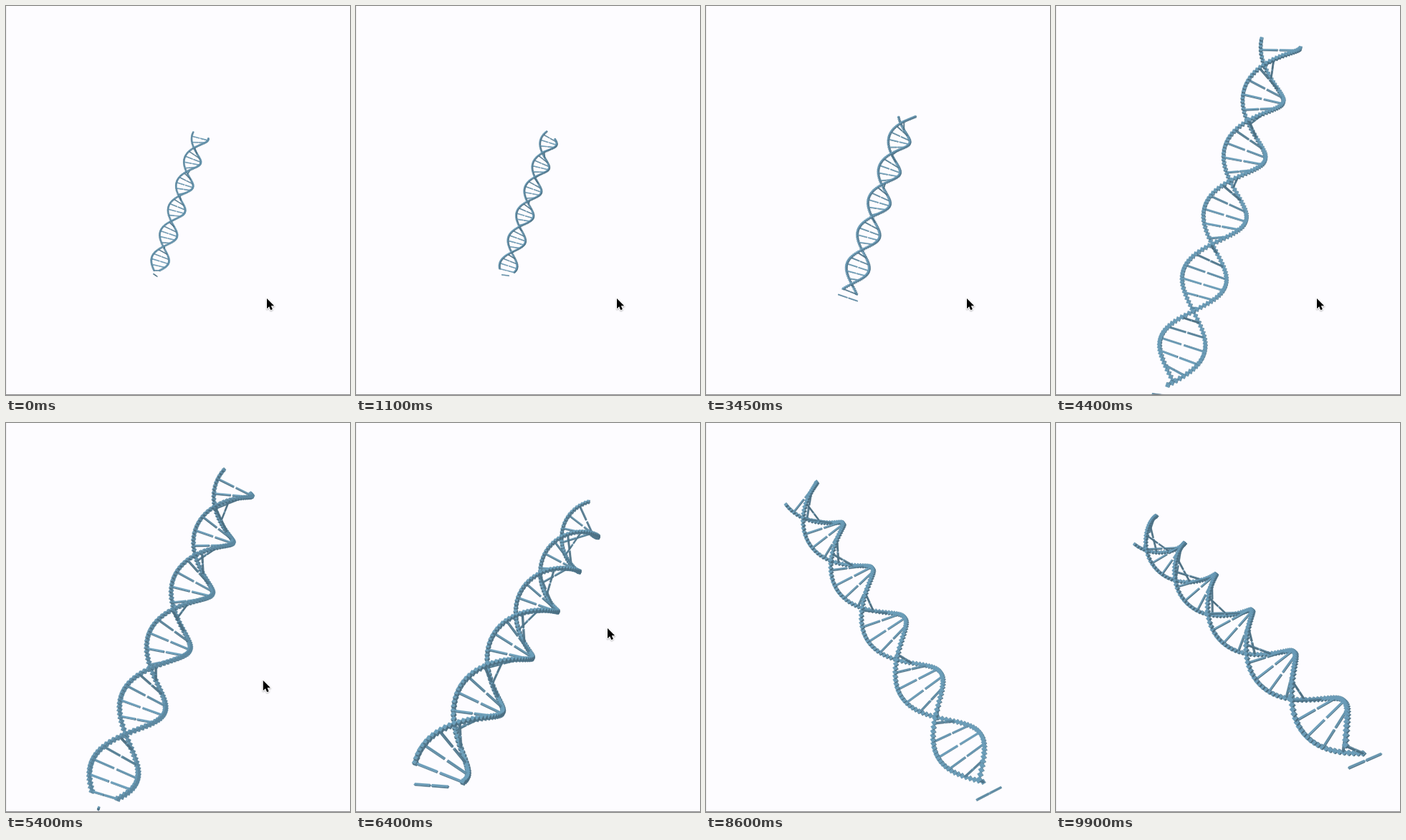
Write an HTML page with a canvas that moves like this. It is 480 px wide and 544 px high and loops after 9950 ms.

```html
<!DOCTYPE html>
<html lang="en">
<head>
<meta charset="utf-8">
<title>Rotating double helix</title>
<style>
html, body { margin: 0; width: 100%; height: 100%; overflow: hidden; background: #fdfcff; }
canvas { display: block; width: 480px; height: 544px; }
</style>
</head>
<body>
<canvas id="stage" width="480" height="544"></canvas>
<script>
const ctx = document.getElementById('stage').getContext('2d');
const LOOP = 9950;
const FOCAL = 750, CX = 242, CY = 273;

// Lengths are in half turns of the helix.
const RADIUS = 0.325, LENGTH = 5.47, MID = 2.75;
const BEADS = 136, BEAD = 0.025;
const RUNGS = 32, RUNG_START = 0.12, RUNG_STEP = 0.1785, RUNG = 0.012;
const COLOR = [101, 148, 174];
const LIGHT = unit([-0.3, -0.6, -0.75]);

// 0 before a, 1 after b, linear between.
const ramp = (t, a, b) => Math.min(1, Math.max(0, (t - a) / (b - a)));
const ease = u => u * u * (3 - 2 * u);
const rad = deg => deg * Math.PI / 180;

function unit(v) {
  const l = Math.hypot(...v);
  return v.map(c => c / l);
}
function dot(a, b) { return a[0] * b[0] + a[1] * b[1] + a[2] * b[2]; }
function mix(p, ...terms) {
  const out = p.slice();
  for (const [k, v] of terms) for (let i = 0; i < 3; i++) out[i] += k * v[i];
  return out;
}

// Steady spin, one zoom, then drags: up, across, and a final swing.
function pose(t) {
  const up = ramp(t, 5000, 6000), across = ramp(t, 6450, 9000);
  const turn = ramp(t, 6450, 7750), dip = ramp(t, 7750, 8600), rise = ramp(t, 8600, 9000);
  return {
    scale: 37.2 * Math.pow(2.5, ease(ramp(t, 3050, 4200))),
    roll: rad(-18 - 12.4 * up + 74 * across),
    tilt: rad(13 + 26 * up - 15 * dip + 13 * rise),
    phase: 0.57 + t / 5000 - 0.3 * turn + 0.47 * dip - 0.29 * rise
  };
}

function project(p) {
  const k = FOCAL / p[2];
  return [CX + p[0] * k, CY + p[1] * k];
}

// Paints the visible faces of a box given by its centre, unit axes and half sizes.
function box({ p, axes, half }) {
  for (let i = 0; i < 3; i++) {
    const sign = dot(p, axes[i]) > 0 ? -1 : 1;
    const j = (i + 1) % 3, k = (i + 2) % 3;
    const c = mix(p, [sign * half[i], axes[i]]);
    const shade = 0.74 + 0.34 * Math.max(0, sign * dot(axes[i], LIGHT));
    ctx.fillStyle = ctx.strokeStyle = `rgb(${COLOR.map(v => Math.round(v * shade)).join()})`;
    ctx.beginPath();
    for (const [a, b] of [[-1, -1], [1, -1], [1, 1], [-1, 1]]) {
      ctx.lineTo(...project(mix(c, [a * half[j], axes[j]], [b * half[k], axes[k]])));
    }
    ctx.closePath();
    ctx.fill();
    ctx.stroke();
  }
}

function helix(t) {
  const { scale, roll, tilt, phase } = pose(t);
  const sx = Math.sin(roll), sy = Math.cos(roll);
  const st = Math.sin(tilt), ct = Math.cos(tilt);
  // View space: x right, y down, z away; d runs down the helix.
  const d = [ct * sx, ct * sy, -st];
  const n = [sy, -sx, 0];
  const b = [st * sx, st * sy, ct];
  const origin = [0, 0, FOCAL / scale];
  const around = a => mix([0, 0, 0], [Math.sin(a), n], [Math.cos(a), b]);
  const angle = s => Math.PI * (s - phase);
  const center = s => mix(origin, [s - MID, d]);
  const beadAxes = [d, around(angle(0)), around(angle(0.5))];
  const parts = [];

  for (let i = 0; i < BEADS; i++) {
    const s = LENGTH * i / (BEADS - 1);
    const r = around(angle(s));
    for (const side of [-1, 1]) {
      parts.push({ p: mix(center(s), [side * RADIUS, r]), axes: beadAxes, half: [BEAD, BEAD, BEAD] });
    }
  }
  const inner = 0.06 * RADIUS, outer = 0.92 * RADIUS;
  for (let i = 0; i < RUNGS; i++) {
    const s = RUNG_START + i * RUNG_STEP;
    const r = around(angle(s));
    const axes = [r, d, around(angle(s + 0.5))];
    for (const side of [-1, 1]) {
      parts.push({
        p: mix(center(s), [side * (inner + outer) / 2, r]),
        axes, half: [(outer - inner) / 2, RUNG, RUNG]
      });
    }
  }
  parts.sort((u, v) => v.p[2] - u.p[2]);
  ctx.lineWidth = 0.3;
  parts.forEach(box);
}

const arrow = new Path2D('M0 0V14.2L3.2 11.2L5.4 16.2L7.9 15.1L5.8 10.2H10.2Z');

function pointer(t) {
  if (t >= 7900) return;
  const up = ramp(t, 5000, 6000), across = ramp(t, 6450, 7750);
  ctx.save();
  ctx.translate(364 - 13 * up + 124 * across, 409 - 122 * up + 38 * across);
  ctx.shadowColor = 'rgba(0,0,0,.3)';
  ctx.shadowBlur = 2;
  ctx.shadowOffsetY = 1;
  ctx.lineWidth = 2;
  ctx.lineJoin = 'round';
  ctx.strokeStyle = '#fff';
  ctx.stroke(arrow);
  ctx.shadowColor = 'transparent';
  ctx.fillStyle = '#000';
  ctx.fill(arrow);
  ctx.restore();
}

function draw(t) {
  ctx.fillStyle = '#fdfcff';
  ctx.fillRect(0, 0, 480, 544);
  helix(t);
  ctx.fillStyle = '#efeef1';
  ctx.fillRect(0, 0, 1, 544);
  ctx.fillStyle = '#89898b';
  ctx.fillRect(0, 543, 480, 1);
  pointer(t);
}

const start = performance.now();
function frame() {
  draw((performance.now() - start) % LOOP);
  requestAnimationFrame(frame);
}
frame();
</script>
</body>
</html>
```
